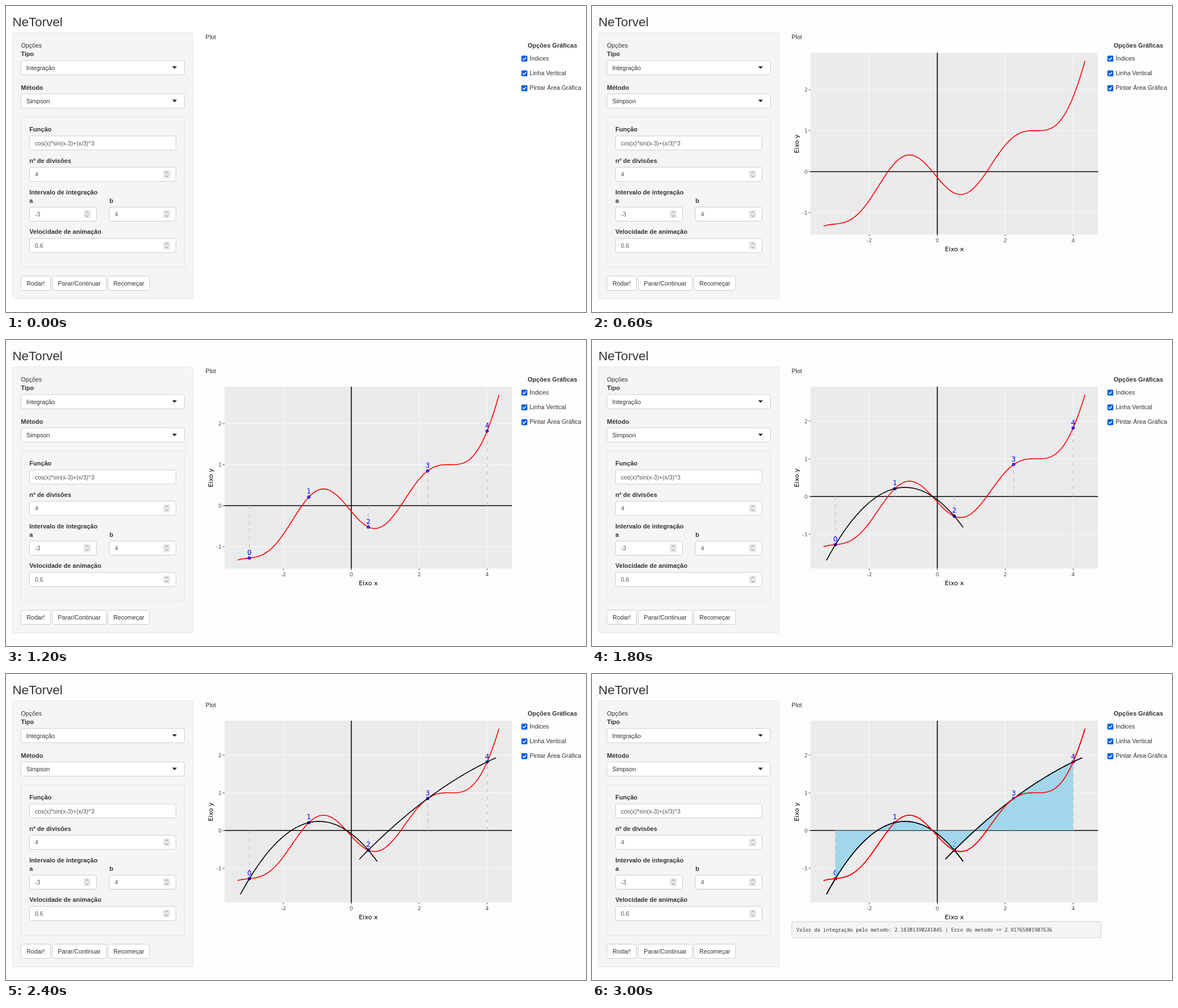
Animation, 1029 px wide and 544 px high, one loop 3.6 s. Source, as an HTML page:

```html
<!DOCTYPE html>
<html lang="pt">
<head>
<meta charset="utf-8">
<title>Integração numérica</title>
<style>
  html, body { margin: 0; width: 100%; height: 100%; overflow: hidden; background: #fff; }
  svg { display: block; width: 1029px; height: 544px; }
  text { font: 10.75px "Liberation Sans", Arial, sans-serif; fill: #333; white-space: pre; }
  .title { font-size: 22.5px; }
  .bold { font-size: 11.05px; font-weight: bold; }
  .value { font-size: 10.5px; fill: #555; }
  .mono { font: 8.8px "Noto Sans Mono", "Liberation Mono", monospace; }
  .tick, .axis, .index { font-family: "DejaVu Sans", Verdana, sans-serif; text-anchor: middle; }
  .tick { font-size: 9.2px; fill: #4d4d4d; }
  .axis { font-size: 11.2px; fill: #000; }
  .index { font-size: 12px; fill: #00f; }
  .well { fill: #f5f5f5; stroke: #e3e3e3; }
  .field { fill: #fff; stroke: #ccc; }
  .output { fill: #f5f5f5; stroke: #ccc; }
  .curve, .parabola { fill: none; stroke: #f00; stroke-width: 1.6; stroke-linejoin: round; }
  .parabola { stroke: #000; }
  .area { fill: #87ceeb; fill-opacity: .73; }

  .step { opacity: 0; animation: 3.6s step-end infinite; }
  .veil { animation-name: from600; }
  .wide { animation-name: wide; }
  .tall { animation-name: from1800; }
  .nodes { animation-name: from1200; }
  .second { animation-name: from2400; }
  .result { animation-name: from3000; }
  @keyframes wide { 0% { opacity: 0 } 16.66% { opacity: 1 } 50%, 100% { opacity: 0 } }
  @keyframes from600 { 0% { opacity: 0 } 16.66%, 100% { opacity: 1 } }
  @keyframes from1200 { 0% { opacity: 0 } 33.33%, 100% { opacity: 1 } }
  @keyframes from1800 { 0% { opacity: 0 } 50%, 100% { opacity: 1 } }
  @keyframes from2400 { 0% { opacity: 0 } 66.66%, 100% { opacity: 1 } }
  @keyframes from3000 { 0% { opacity: 0 } 83.33%, 100% { opacity: 1 } }
</style>
</head>
<body>
<svg id="stage" viewBox="0 0 1029 544"></svg>
<script>
const text = (x, y, s, cls = "", extra = "") => `<text x="${x}" y="${y}" class="${cls}" ${extra}>${s}</text>`;
const box = (cls, x, y, w, h, r = 3) =>
  `<rect class="${cls}" x="${x}" y="${y}" width="${w}" height="${h}" rx="${r}"/>`;
const line = (x1, y1, x2, y2, color, width, extra = "") =>
  `<path d="M${x1} ${y1}L${x2} ${y2}" stroke="${color}" stroke-width="${width}" ${extra}/>`;
const group = (cls, body) => `<g class="${cls}">${body}</g>`;

// Form controls
const select = (y, label) =>
  box("field", 26.5, y, 290, 25.3) + text(36, y + 16.7, label) +
  `<path d="M294.8 ${y + 10.3}h8.4l-4.2 4.4z" fill="#222"/>`;

const input = (x, y, w, value) => box("field", x, y, w, 25) + text(x + 9.7, y + 16.5, value, "value");

const number = (x, y, w, value) => {
  const cx = x + w - 16.5, cy = y + 12.5;
  return input(x, y, w, value) +
    `<rect x="${cx - 6.5}" y="${cy - 7}" width="13" height="14" rx="1.5" fill="#e9e9ed"/>
     <path d="M${cx - 2.7} ${cy - 2}l2.7 -2.6l2.7 2.6m-5.4 4l2.7 2.6l2.7 -2.6"
       fill="none" stroke="#777" stroke-width="1"/>`;
};

const button = (x, w, label) =>
  box("field", x, 480.3, w, 25.2) + text(x + w / 2, 497, label, "", 'text-anchor="middle"');

const check = (y, label) =>
  `<rect x="914.4" y="${y - 5.2}" width="10.6" height="10.6" rx="1.6" fill="#0060df"/>
   <path d="M916.8 ${y + .2}l2 2.1l3.9 -4.4" fill="none" stroke="#fff" stroke-width="1.5"/>` +
  text(929, y + 3.4, label);

const form =
  text(11.5, 35.6, "NeTorvel", "title") +
  box("well", 11.5, 47.8, 320, 472.7) +
  text(26.5, 74, "Opções") +
  text(26.5, 89.2, "Tipo", "bold") + select(96.9, "Integração") +
  text(26.5, 148.7, "Método", "bold") + select(156.2, "Simpson") +
  box("well", 26.5, 197.3, 290, 267.4) +
  text(41.5, 223, "Função", "bold") + input(41.5, 231, 260, "cos(x)*sin(x-3)+(x/3)^3") +
  text(41.5, 278.7, "nº de divisões", "bold") + number(41.5, 286.7, 260, "4") +
  text(41.5, 334.6, "Intervalo de integração", "bold") +
  text(41.5, 349.8, "a", "bold") + number(41.5, 357.5, 119, "-3") +
  text(183.5, 349.8, "b", "bold") + number(183.3, 357.5, 118.2, "4") +
  text(41.5, 405.4, "Velocidade de animação", "bold") + number(41.5, 413.3, 260, "0.6") +
  button(26.5, 52.3, "Rodar!") + button(82.3, 95.4, "Parar/Continuar") + button(181.2, 73.4, "Recomeçar") +
  text(354, 59, "Plot") +
  text(925.5, 74, "Opções Gráficas", "bold") +
  check(93.4, "Índices") + check(119.6, "Linha Vertical") + check(146, "Pintar Área Gráfica");

// Plot
const left = 387.7, right = 897.8, top_ = 83, bottom = 406.2;
const f = x => Math.cos(x) * Math.sin(x - 3) + (x / 3) ** 3;
const nodes = [0, 1, 2, 3, 4].map(i => -3 + 1.75 * i);
const px = x => 612.6 + 60.25 * x;

// Parabola through three consecutive nodes
const simpson = i => {
  const [a, m, b] = nodes.slice(i, i + 3), h = m - a;
  const slope = (f(b) - f(a)) / (2 * h), bend = (f(a) - 2 * f(m) + f(b)) / (2 * h * h);
  return x => f(m) + slope * (x - m) + bend * (x - m) ** 2;
};
const parabolas = [0, 2].map(i => ({ fn: simpson(i), a: nodes[i], b: nodes[i + 2] }));

const makePlot = (zero, unit) => {
  const py = y => zero - unit * y;
  const trace = (fn, a, b) => Array.from({ length: 101 }, (_, i) => {
    const x = a + (b - a) * i / 100;
    return px(x).toFixed(2) + " " + py(fn(x)).toFixed(2);
  }).join("L");

  const curve = `<path class="curve" d="M${trace(f, -3.35, 4.35)}"/>`;
  const arcs = parabolas.map(p => `<path class="parabola" d="M${trace(p.fn, p.a - .2625, p.b + .2625)}"/>`);
  const area = parabolas.map(p =>
    `<path class="area" d="M${px(p.a)} ${zero}L${trace(p.fn, p.a, p.b)}L${px(p.b)} ${zero}z"/>`).join("");

  const xTicks = [-2, 0, 2, 4].map(v =>
    line(px(v), top_, px(v), bottom, "#f9f9f9", 1) +
    line(px(v), bottom, px(v), bottom + 3, "#444", 1) +
    text(px(v), 420.3, v, "tick")).join("");
  const yTicks = [-1, 0, 1, 2].map(v =>
    line(left, py(v), right, py(v), "#f9f9f9", 1) +
    line(left - 3.2, py(v), left, py(v), "#444", 1) +
    text(382.5, py(v) + 3.3, v, "tick", 'style="text-anchor:end"')).join("");

  const base =
    `<rect x="${left}" y="${top_}" width="${right - left}" height="${bottom - top_}" fill="#ebebeb"/>` +
    xTicks + yTicks +
    line(left, zero, right, zero, "#000", 1.6) +
    line(px(0), top_, px(0), bottom, "#000", 1.6) +
    text(642.8, 436.4, "Eixo x", "axis") +
    text(0, 0, "Eixo y", "axis", 'transform="translate(367 245) rotate(-90)"');

  const marks = nodes.map((x, i) => {
    const y = py(f(x));
    return line(px(x), zero, px(x), y, "#c6c6c6", 1.4, 'stroke-dasharray="6.8"') +
      `<circle cx="${px(x)}" cy="${y}" r="2.1" fill="#00f" fill-opacity=".35" stroke="#1010dc" stroke-width="1.5"/>` +
      text(px(x), y - 5.8, i, "index");
  }).join("");

  return { base, curve, marks, arcs, area };
};

const wide = makePlot(294.5, 72.9), tall = makePlot(278.3, 67);
const output = box("output", 354.6, 440.2, 548.2, 28.6) +
  text(362.6, 457.8, "Valor da integração pelo metodo: 2.18301390241045 | Erro do metodo &lt;= 2.91765801907636", "mono");

document.getElementById("stage").innerHTML =
  group("step veil", '<rect width="1029" height="544" fill="#fdfdfd"/>') +
  form +
  group("step wide", wide.base + wide.curve + group("step nodes", wide.marks)) +
  group("step tall",
    tall.base + tall.curve + tall.marks + tall.arcs[0] +
    group("step second", tall.arcs[1]) +
    group("step result", tall.area + tall.arcs.join("") + tall.curve + output));
</script>
</body>
</html>
```
